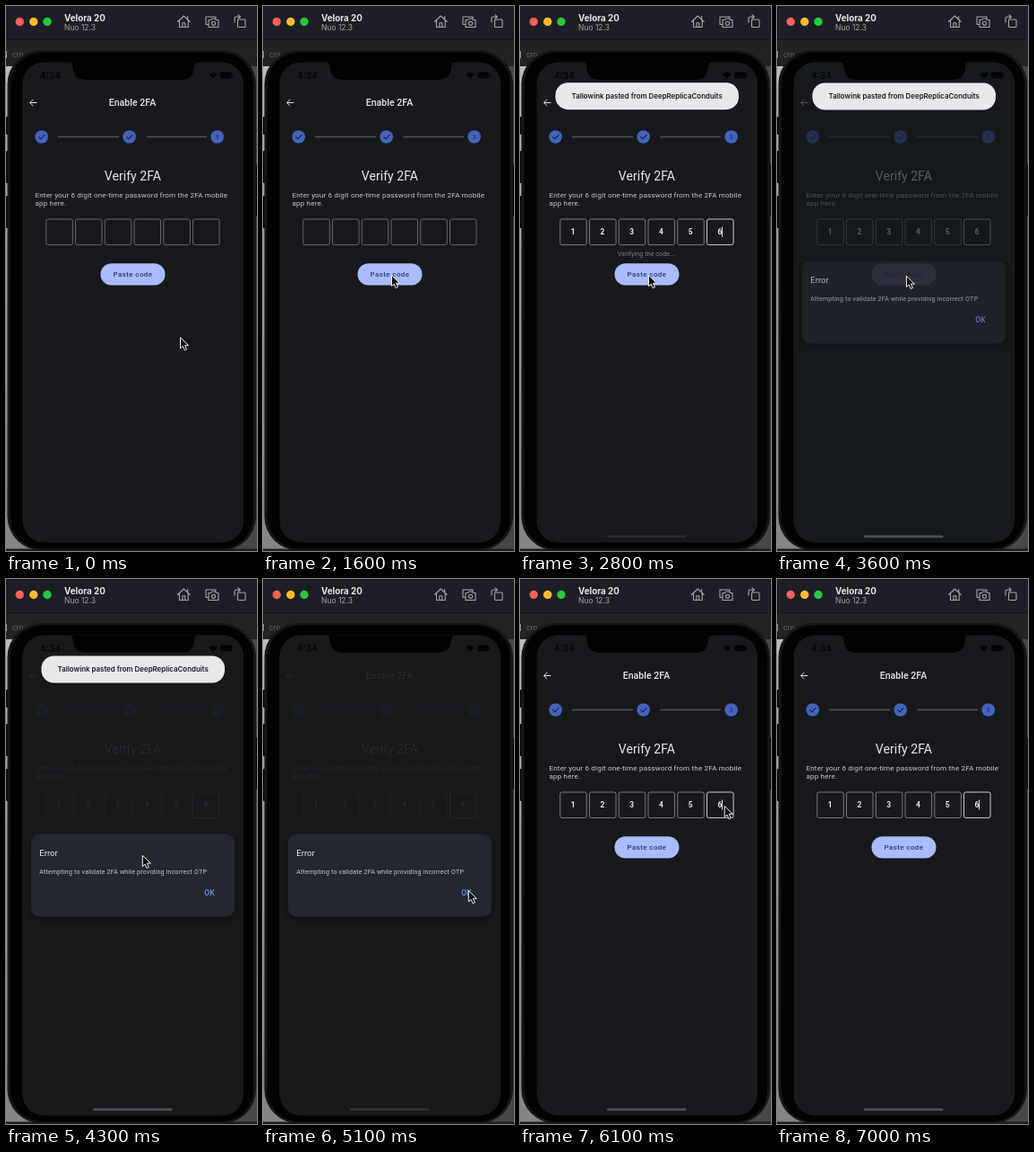
Write an HTML page that moves like this. It is 280x606 px and loops after 7100 ms.

```html
<!DOCTYPE html>
<html lang="en">
<head>
<meta charset="utf-8">
<title>Code verification</title>
<style>
  html, body { margin: 0; width: 100%; height: 100%; overflow: hidden; background: #232225; }
  svg { display: block; width: 280px; height: 606px; }
  text { font-family: Roboto, sans-serif; fill: #e6e7ea; white-space: pre; }
  .sys { font-family: Inter, sans-serif; }
  .mid { text-anchor: middle; }
  .med { font-weight: 500; }
  .line { fill: none; stroke-linecap: round; stroke-linejoin: round; }
</style>
</head>
<body>
<svg viewBox="0 0 280 606">
  <defs>
    <clipPath id="screenClip"><rect x="18.5" y="62.5" width="246.5" height="534" rx="24"/></clipPath>
    <filter id="soft" x="-10%" y="-20%" width="120%" height="150%" color-interpolation-filters="sRGB">
      <feDropShadow dx="0" dy="4" stdDeviation="3.5" flood-opacity=".3"/>
    </filter>
    <linearGradient id="desk" x2="0" y2="1">
      <stop stop-color="#bcbabc"/>
      <stop offset="1" stop-color="#858386"/>
    </linearGradient>
  </defs>

  <!-- desktop behind the device -->
  <rect width="280" height="606" fill="#232225"/>
  <rect y="67" width="140" height="537" fill="url(#desk)"/>
  <rect x="140" y="67" width="140" height="537" fill="#48474a"/>
  <rect y="603.5" width="280" height="3" fill="#211c20"/>
  <path d="M0.5 50V58" stroke="#98969a"/>
  <text class="sys" x="7" y="57" font-size="8" style="fill:#656368">cro</text>

  <!-- device body -->
  <g fill="#0b0b0d">
    <rect y="123" width="4" height="20" rx="1"/>
    <rect y="161" width="4" height="36" rx="1"/>
    <rect y="211" width="4" height="36" rx="1"/>
    <rect x="276" y="176" width="4" height="58" rx="1"/>
  </g>
  <rect x="1.5" y="49" width="277.5" height="556.5" rx="38" fill="#161618"/>
  <rect x="4.5" y="51.5" width="271.5" height="552" rx="36" fill="#020203"/>

  <g clip-path="url(#screenClip)">
    <rect x="18" y="62" width="248" height="535" fill="#17191c"/>

    <g id="page">
      <path class="line" d="M34 107.5H27M30 104.2L26.7 107.5L30 110.8" stroke="#dedfe2"/>
      <text class="mid med" x="141" y="111.2" font-size="10.6">Enable 2FA</text>
      <path d="M58 145.5H126M156.5 145.5H224" stroke="#515359" stroke-width="1.4"/>
      <g id="steps" fill="#4363bd"></g>
      <text class="mid" x="141.4" y="194.3" font-size="14.1">Verify 2FA</text>
      <g font-size="8.1" letter-spacing=".15">
        <text x="32.5" y="212.8" style="fill:#c6c8cc">Enter your 6 digit one-time password from the 2FA mobile</text>
        <text x="32.5" y="222" style="fill:#c6c8cc">app here.</text>
      </g>
      <g id="cells" fill="none"></g>
      <g id="digits" class="mid"></g>
      <path id="caret" d="M225.5 245.5V256.5" stroke="#dfe3f5"/>
      <text id="status" class="mid" x="141" y="277.6" font-size="7" letter-spacing=".12" style="fill:#7f8186">Verifying the code...</text>
      <g id="paste">
        <rect x="105.5" y="286.3" width="72" height="24.2" rx="12.1" fill="#abbafb"/>
        <rect id="press" x="105.5" y="286.3" width="72" height="24.2" rx="12.1" fill="#4a62b0"/>
        <text class="mid med" x="141.5" y="301.2" font-size="8" letter-spacing=".38" style="fill:#2b3f80">Paste code</text>
      </g>
    </g>

    <rect id="barrier" x="18" y="62" width="248" height="535" fill="#17191c"/>

    <g id="dialog">
      <rect x="28" y="283.5" width="227" height="92" rx="9.5" fill="#23272f" filter="url(#soft)"/>
      <text x="37.3" y="308.3" font-size="9.5">Error</text>
      <text x="37.3" y="328.3" font-size="7" letter-spacing=".21" style="fill:#c3c5ca">Attempting to validate 2FA while providing incorrect OTP</text>
      <rect id="okPress" x="208" y="338.5" width="38" height="21.5" rx="2" fill="#2d323c"/>
      <text class="med" x="221.3" y="352.2" font-size="8.5" style="fill:#7595ed">OK</text>
    </g>

    <text class="sys" x="38" y="81" font-size="10" font-weight="600" style="fill:#040506">4:34</text>
    <g fill="#040506">
      <path d="M226 76Q231 71.5 236 76L231 81Z"/>
      <rect x="239" y="73.5" width="13" height="7" rx="2"/>
      <rect x="252.6" y="75.6" width="1.2" height="2.8" rx=".6"/>
    </g>
    <rect id="homeBar" x="97" y="588.6" width="88.5" height="2.6" rx="1.3" fill="#4c4e51"/>
    <path d="M68 62Q74.5 62 74.5 67.5Q75 82 89 82H195.5Q209.5 82 210 67.5Q210 62 216.5 62Z" fill="#020203"/>

    <g id="banner">
      <rect x="39.5" y="85.5" width="204.5" height="30" rx="14" fill="#eae7eb"/>
      <text class="sys mid" x="141.7" y="103.3" font-size="7.9" font-weight="600" style="fill:#1c1b1f">Tallowink pasted from DeepReplicaConduits</text>
    </g>
  </g>

  <!-- window bar -->
  <rect width="280" height="37.5" fill="#1e1e26"/>
  <path d="M0 37.5H280" stroke="#151518"/>
  <circle cx="15.3" cy="17.5" r="4.7" fill="#fe5f57"/>
  <circle cx="30.8" cy="17.5" r="4.7" fill="#febc2e"/>
  <circle cx="46" cy="17.5" r="4.7" fill="#28c840"/>
  <text class="sys" x="65" y="17" font-size="9.8" font-weight="700">Velora 20</text>
  <text class="sys" x="65" y="27" font-size="8.5" style="fill:#a2a2a7">Nuo 12.3</text>
  <g class="line" stroke="#a4a4a9" stroke-width="1.1">
    <path d="M191.5 17.5L198.3 11L205.2 17.5M193.5 16V23.5H203.2V16M196.9 23.5V18.7H199.8V23.5M202.7 14.5V11.5"/>
    <path d="M225.5 20.5H223V12H234V14M226 15.5H228.5L229.7 14H233.2L234.4 15.5H237V23.5H226Z"/>
    <circle cx="231.5" cy="19.3" r="2.1"/>
    <rect x="258.5" y="15" width="8.5" height="8.5" rx="1"/>
    <path d="M255 18V14Q255 12 257 12H261M259 9.8L261.3 12L259 14.2"/>
  </g>

  <path id="pointer" d="M0 0V12.2L2.8 9.7L4.8 14.2L7 13.2L5 8.8H9Z" fill="#08080a" stroke="#f2f2f4" stroke-width="1" stroke-linejoin="round"/>
</svg>

<script>
const LOOP = 7100, STEP = 100;
const $ = id => document.getElementById(id);

function add(parent, tag, attrs, text = "") {
  const el = document.createElementNS("http://www.w3.org/2000/svg", tag);
  for (const key in attrs) el.setAttribute(key, attrs[key]);
  el.textContent = text;
  return $(parent).appendChild(el);
}

for (let i = 0; i < 3; i++) {
  const x = 40 + i * 98;
  add("steps", "circle", { cx: x - .3, cy: 145.5, r: 7.3 });
  if (i < 2) add("steps", "path", {
    d: `M${x - 3.3} 145.7l2.2 2.2l4.2 -4.6`, class: "line", stroke: "#17223f", "stroke-width": 1.1
  });
  else add("steps", "text", { x: x - .3, y: 147.8, "font-size": 6.5, class: "mid", style: "fill:#1b2b5a" }, "3");
}

const cells = [];
for (let i = 0; i < 6; i++) {
  const x = 44.8 + i * 32.75;
  cells.push(add("cells", "rect", { x, y: 237, width: 29.5, height: 28.6, rx: 2 }));
  add("digits", "text", { x: x + 14.4, y: 253.8, "font-size": 8.5, "font-weight": 700 }, i + 1);
}

// Each row: time, value; eased between rows.
const tracks = {
  x: [[0, 194.5], [200, 193], [800, 145], [1200, 143.5], [3500, 143.5], [4000, 152.3], [4300, 152.3], [4700, 232], [4900, 229.3], [5900, 229.3], [6500, 225]],
  y: [[0, 368.5], [200, 366], [800, 301], [1200, 299.4], [3500, 299.4], [4000, 307.4], [4300, 307.4], [4700, 352], [4900, 346.5], [5900, 346.5], [6500, -16]],
  banner: [[2400, -58], [2800, -.3], [2900, 0], [4400, 0], [4800, -58]],
  barrier: [[3400, 0], [3700, .925], [5300, .925], [5600, 0]],
  dialog: [[3400, 0], [3700, 1], [5600, 1], [5800, 0]],
  home: [[2600, 0], [3100, 1], [4800, 1], [5400, 0], [5700, 0], [6100, 1]],
  press: [[2100, 0], [2200, .22], [2300, .22], [2500, 0]],
  okPress: [[5300, 0], [5500, 1]]
};

function at(name, t) {
  const rows = tracks[name];
  const i = rows.findIndex(row => row[0] > t);
  if (i < 0) return rows[rows.length - 1][1];
  if (i === 0) return rows[0][1];
  const [t0, a] = rows[i - 1], [t1, b] = rows[i];
  const p = (t - t0) / (t1 - t0);
  return a + (b - a) * p * p * (3 - 2 * p);
}

const fade = (id, value) => $(id).setAttribute("opacity", value);
const between = (t, from, to) => t >= from && t < to ? 1 : 0;

function draw(t) {
  const filled = between(t, 2400, LOOP);
  $("pointer").setAttribute("transform", `translate(${at("x", t)} ${at("y", t)})`);
  $("banner").setAttribute("transform", `translate(0 ${at("banner", t)})`);
  fade("banner", between(t, 2500, 4800));
  fade("barrier", at("barrier", t));
  fade("dialog", at("dialog", t));
  fade("homeBar", at("home", t));
  fade("press", at("press", t));
  fade("okPress", at("okPress", t));
  fade("digits", filled);
  fade("caret", filled - between(t, 3600, 5500));
  fade("status", between(t, 2500, 3500));
  cells.forEach((cell, i) =>
    cell.setAttribute("stroke", !filled ? "#65676b" : i < 5 ? "#77797d" : "#c9cbd0"));
}

const start = performance.now();
function tick() {
  const t = (performance.now() - start) % LOOP;
  draw(Math.floor(t / STEP) * STEP);
  requestAnimationFrame(tick);
}
tick();
</script>
</body>
</html>
```
